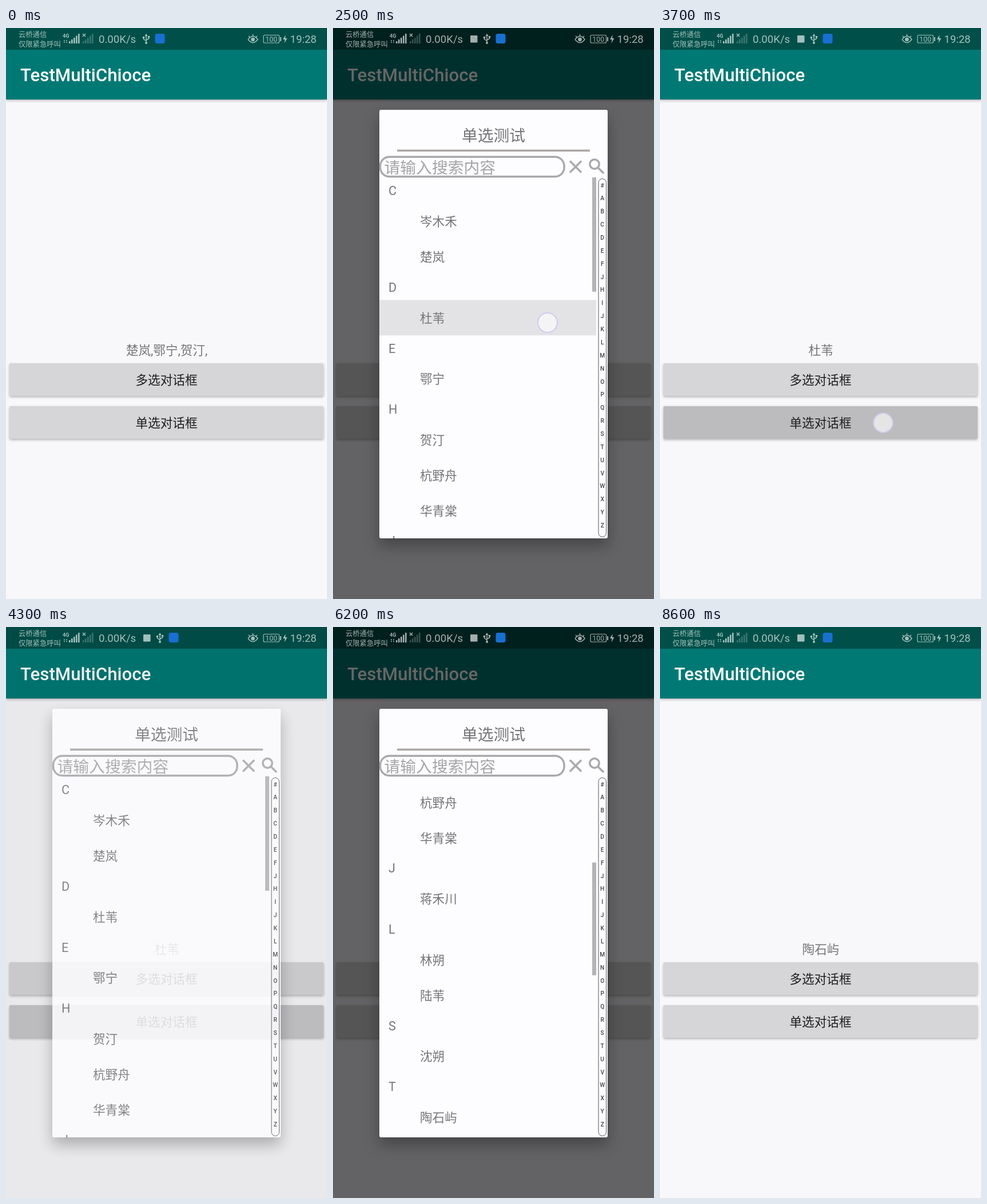
Recreate the animation shown at these times as an HTML page. Size 561x998 px, loop 9.8 s.

```html
<!DOCTYPE html>
<html lang="zh-CN">
<head>
<meta charset="utf-8">
<style>
  html, body { margin: 0; width: 100%; height: 100%; overflow: hidden; background: #f8f7fa; }
  svg { display: block; width: 561px; height: 998px; }
  text { font: 21.6px Roboto, "Noto Sans CJK SC", "Noto Sans CJK", sans-serif; fill: #757476; }
  .mid { text-anchor: middle; }
  .button { fill: #d6d5d8; filter: drop-shadow(0 2px 2px rgba(0,0,0,.28)); }
  .label { font-weight: 500; fill: #1d1c1e; }
  .line { fill: none; stroke: #a9a8ab; stroke-width: 3.5; }
  #title { font-size: 31.2px; font-weight: 500; fill: #fff; }
  #dialog .big { font-size: 27.8px; }
  #panel { fill: #fdfcff; filter: drop-shadow(0 13px 13px rgba(0,0,0,.3)); }
  #letters text { font-size: 10.2px; font-weight: 500; fill: #444; }
  #status { opacity: .64; }
  #status text { fill: #fff; font-size: 18.6px; }
  #status .small { font-size: 12.3px; }
  #status .tiny { font-size: 9px; font-weight: 700; }
  #status .thin { fill: none; stroke: #fff; stroke-width: 1.5; }
</style>
</head>
<body>
<svg viewBox="0 0 561 998">
  <clipPath id="listClip"><rect x="81" y="261" width="399" height="631"/></clipPath>

  <rect width="561" height="998" fill="#f8f7fa"/>
  <rect width="561" height="125" fill="#007974" style="filter:drop-shadow(0 2px 2px rgba(0,0,0,.25))"/>
  <rect width="561" height="38" fill="#005049"/>
  <text id="title" x="25" y="93">TestMultiChioce</text>
  <text id="result" class="mid" x="281" y="571"></text>
  <rect class="button" x="6" y="586" width="549" height="57" rx="2"/>
  <rect class="button" x="6" y="661" width="549" height="57" rx="2"/>
  <rect id="press" x="6" y="661" width="549" height="57" rx="2" opacity="0"/>
  <text class="mid label" x="280.5" y="623">多选对话框</text>
  <text class="mid label" x="280.5" y="698">单选对话框</text>
  <rect id="dim" width="561" height="998" opacity="0"/>

  <g id="dialog" opacity="0">
    <rect id="panel" x="81" y="143" width="399" height="749" rx="3"/>
    <text class="mid big" x="280.5" y="198">单选测试</text>
    <path class="line" d="M112 214.3H449" style="stroke:#aaa7a5"/>
    <g clip-path="url(#listClip)">
      <g id="list"><rect id="row" x="81" width="379" height="61.8"/></g>
      <rect id="thumb" x="453" width="7" fill="#b5b3b6"/>
    </g>
    <rect class="line" x="82.5" y="225.2" width="321.5" height="34.6" rx="16"/>
    <text class="big" x="89.5" y="253.5" style="fill:#a5a4a7">请输入搜索内容</text>
    <path class="line" d="M414 232.5L434 252.5M434 232.5L414 252.5"/>
    <circle class="line" cx="457" cy="238" r="8.2"/>
    <path class="line" d="M463 244L473 254"/>
    <rect x="464" y="263.5" width="13.5" height="626" rx="6.7" fill="none" stroke="#555"/>
    <g id="letters"></g>
  </g>

  <g id="status" fill="#fff">
    <text class="small" x="22" y="15.5">云桥通信</text>
    <text class="small" x="22" y="32.5">仅限紧急呼叫</text>
    <text class="tiny" x="99" y="17">4G</text>
    <path class="thin" d="M102 21v5M106 21v5" stroke-dasharray="2 1"/>
    <path d="M110 23h2.6v4h-2.6zM114 20h2.6v7h-2.6zM118 17h2.6v10h-2.6zM122 13.5h2.6v13.5h-2.6zM126 10h2.6v17h-2.6z"/>
    <path class="thin" d="M134 10l5 5m0-5l-5 5"/>
    <path opacity=".35" d="M134 23h2.6v4h-2.6zM138 20h2.6v7h-2.6zM142 17h2.6v10h-2.6zM146 13.5h2.6v13.5h-2.6zM150 10h2.6v17h-2.6z"/>
    <text x="162" y="26">0.00K/s</text>
    <rect id="notice" x="240" y="13" width="12.5" height="12.5" rx="1"/>
    <g id="usb">
      <path class="thin" d="M269 13V26M264.5 16.5V19.5L269 22.5M273.5 15.5V18.5L269 21"/>
      <path d="M269 10l2.6 4h-5.2zM262.8 15h3.4v3h-3.4zM271.8 14h3.4v3h-3.4z"/>
      <circle cx="269" cy="26" r="2"/>
    </g>
    <path class="thin" d="M423 20q8.5-11 17 0q-8.5 11-17 0M424 14l2 2M431.5 11v3M439 14l-2 2"/>
    <circle cx="431.5" cy="20" r="3.3"/>
    <rect class="thin" x="450" y="12.5" width="27.5" height="13.5" rx="2" style="stroke-width:1.2"/>
    <path d="M479 16h2v7h-2z"/>
    <text class="small mid" x="463.7" y="23.7">100</text>
    <path d="M488.5 12l-4.5 8h3.5l-1 6.5l5-8.5h-3.5z"/>
    <text x="496.5" y="26">19:28</text>
  </g>
  <rect id="badge" y="10" width="17" height="17" rx="3.5" fill="#1670d4"/>
  <circle id="touch" r="17" fill="rgba(255,255,255,.72)" stroke="#cfc8f2" stroke-width="2" opacity="0"/>
</svg>

<script>
const LOOP = 9800, STEP = 100;
const $ = id => document.getElementById(id);
const set = (id, attrs) => {
  for (const key in attrs) $(id).setAttribute(key, attrs[key]);
};

function addText(parentId, x, y, content, cls = '') {
  const node = document.createElementNS('http://www.w3.org/2000/svg', 'text');
  node.setAttribute('x', x);
  node.setAttribute('y', y);
  node.setAttribute('class', cls);
  node.textContent = content;
  $(parentId).append(node);
}

const sections = ['C 岑木禾 楚岚', 'D 杜苇', 'E 鄂宁', 'H 贺汀 杭野舟 华青棠', 'J 蒋禾川',
  'L 林朔 陆苇', 'S 沈朔', 'T 陶石屿 田野汀', 'W 魏汀 吴屿 温木川', 'Z 周禾 郑石舟1 郑石舟2'];
const HEADER = 44.85, ITEM = 61.8;
let rowTop = 262.3;
for (const section of sections) {
  const [letter, ...names] = section.split(' ');
  addText('list', 97, rowTop + HEADER / 2 + 7.7, letter);
  rowTop += HEADER;
  for (const name of names) {
    addText('list', 152, rowTop + ITEM / 2 + 8.2, name);
    rowTop += ITEM;
  }
}
[...'#ABCDEFJHIJKLMNOPQRSTUVWXYZ'].forEach((c, i) =>
  addText('letters', 470.7, 278.6 + i * 22.86, c, 'mid'));

// Piecewise linear value through [time, value] points.
function track(t, points) {
  const i = points.findIndex(p => p[0] > t);
  if (i === 0) return points[0][1];
  if (i < 0) return points[points.length - 1][1];
  const [t0, v0] = points[i - 1], [t1, v1] = points[i];
  return v0 + (v1 - v0) * (t - t0) / (t1 - t0);
}

// Opening and closing curves, shifted to each start time.
const shifted = (start, points) => points.map(([t, v]) => [start + t, v]);
const fadeIn = [[0, 0], [100, .86], [200, 1]], fadeOut = [[0, 1], [100, .5], [200, .05], [300, 0]];
const dimIn = [[0, 0], [100, .06], [300, .46], [400, .6]], dimOut = [[0, .6], [200, .25], [400, 0]];
const openTimes = [900, 4200], closeTimes = [2800, 8200];
const timeline = (show, hide) =>
  openTimes.flatMap((start, i) => [...shifted(start, show), ...shifted(closeTimes[i], hide)]);
const dialogTrack = timeline(fadeIn, fadeOut), dimTrack = timeline(dimIn, dimOut);

const scrollTrack = [[4800, 0], [5000, 249], [5200, 410], [5500, 475], [6700, 475], [6800, 994]];
const pressTrack = [[400, 0], [600, .12], [900, .1], [1200, 0],
  [3400, 0], [3700, .12], [4200, .1], [4500, 0]];
const rowTrack = [[2300, 0], [2500, .1], [3200, .1], [3300, 0], [7900, 0], [8100, .1]];

// Each touch: begin, release, fade end, x, y, whether it drags the list.
const touches = [[500, 800, 1000, 390, 690], [2400, 2700, 3200, 375, 515],
  [3500, 3900, 4200, 390, 690], [4700, 5100, 5300, 460, 802, true],
  [6800, 7000, 7300, 470, 732], [8000, 8200, 8500, 375, 340]];

function drawTouch(t, scroll) {
  const touch = touches.find(([begin, , end]) => t >= begin && t < end);
  if (!touch) return set('touch', { opacity: 0 });
  const [, release, end, x, y, drags] = touch;
  set('touch', { cx: x, cy: drags ? y - scroll : y, opacity: track(t, [[release, .85], [release + 100, .4], [end, 0]]) });
}

function draw(t) {
  const scroll = track(t, scrollTrack);
  const [firstClose, secondClose] = closeTimes;
  $('result').textContent = t < firstClose ? '楚岚,鄂宁,贺汀,' : t < secondClose ? '杜苇' : '陶石屿';
  set('dialog', { opacity: track(t, dialogTrack) });
  set('dim', { opacity: track(t, dimTrack) });
  set('press', { opacity: track(t, pressTrack) });
  set('list', { transform: `translate(0 ${-scroll})` });
  set('thumb', { y: 261 + scroll * .317, height: 200 - scroll * .006 });
  set('row', { y: (t < 4000 ? 475.5 : 307.2) + scroll, opacity: track(t, rowTrack) });

  const shift = t < STEP ? 0 : 24;
  set('notice', { opacity: shift ? 1 : 0 });
  set('usb', { transform: `translate(${shift - 24} 0)` });
  set('badge', { x: 260.5 + shift });
  drawTouch(t, scroll);
}

function tick() {
  draw(Math.floor(performance.now() % LOOP / STEP) * STEP);
  requestAnimationFrame(tick);
}
tick();
</script>
</body>
</html>
```
